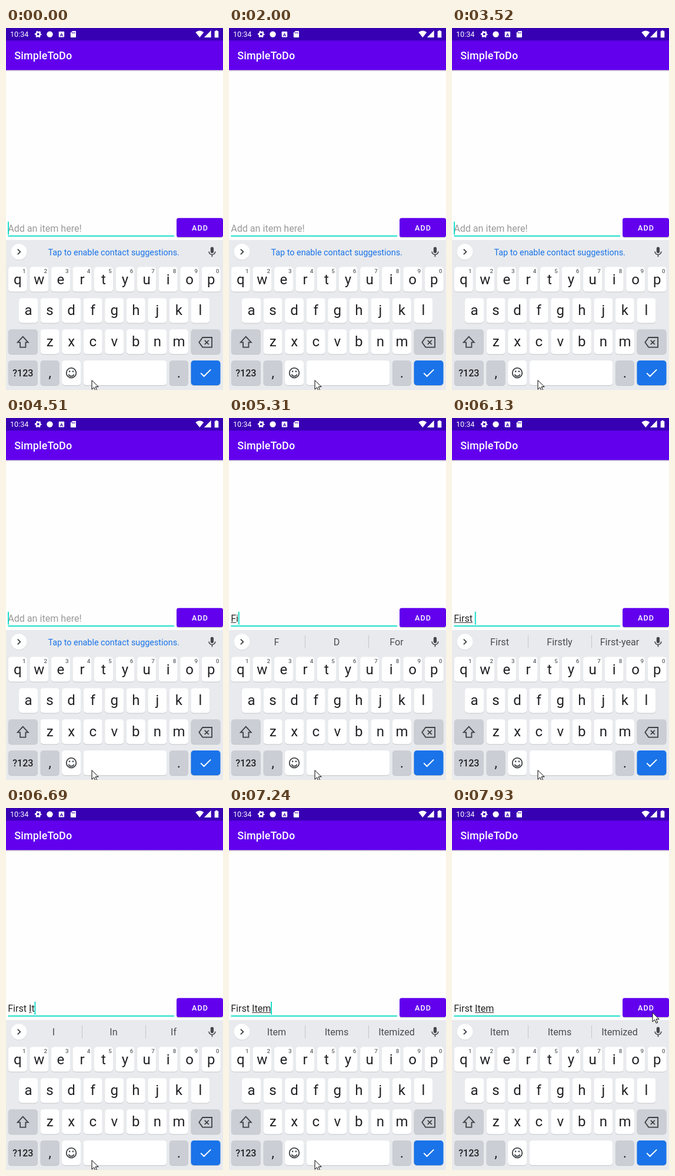
An HTML page that plays this animation: 369x613 px, repeating every 8 s.

```html
<!DOCTYPE html>
<html lang="en">
<head>
<meta charset="utf-8">
<title>To-do list</title>
<style>
  html, body { margin: 0; width: 100%; height: 100%; overflow: hidden; background: #fefefe; }
  svg { display: block; width: 369px; height: 613px; font-family: Roboto, sans-serif; }
  text { white-space: pre; }
  .mid { text-anchor: middle; }
  .line { fill: none; stroke: #3c4043; stroke-width: 1.8; }
</style>
</head>
<body>
<svg viewBox="0 0 369 613">
  <defs>
    <linearGradient id="shade" x2="0" y2="1">
      <stop stop-opacity=".22"/><stop offset="1" stop-opacity="0"/>
    </linearGradient>
  </defs>

  <!-- app bar and status bar -->
  <rect width="369" height="613" fill="#fefefe"/>
  <rect y="71" width="369" height="3" fill="url(#shade)"/>
  <rect width="369" height="71.3" fill="#6200ee"/>
  <rect width="369" height="21.4" fill="#3700b3"/>
  <text x="14.2" y="53" font-size="17.95" font-weight="500" letter-spacing=".15" fill="#fff">SimpleToDo</text>
  <g fill="#fff">
    <text x="7" y="15.2" font-size="12.6">10:34</text>
    <g fill="none" stroke="#fff" transform="translate(54.7 10.6)">
      <circle r="3.3" stroke-width="2.6"/>
      <circle r="5" stroke-width="1.7" stroke-dasharray="2.618" stroke-dashoffset="1.309"/>
    </g>
    <circle cx="74.5" cy="10.6" r="5.2"/>
    <rect x="89.7" y="6" width="9.4" height="9.4" rx="1"/>
    <text class="mid" x="94.4" y="13.6" font-size="8" font-weight="700" fill="#3700b3">A</text>
    <path d="M113 5h5q1 0 1 1v9q0 1-1 1h-7.2q-1 0-1-1V8.2z"/>
    <path d="M112.6 7v2.4m2.1-2.4v2.4m2.1-2.4v2.4" stroke="#3700b3"/>
    <path d="M322.3 7.2Q329.3 2 336.3 7.2L329.3 16z"/>
    <path d="M348.7 4v12h-11.8z"/>
    <path d="M356.6 4h2.8v1.3h1.9v10.9h-6.6V5.3h1.9z"/>
  </g>

  <!-- entry row -->
  <rect x="290" y="324" width="79" height="31.4" rx="3.6" fill="#000" opacity=".2"/>
  <rect x="290" y="321.8" width="79" height="32.2" rx="3.6" fill="#6200ee"/>
  <text class="mid" x="330.1" y="342.7" font-size="12.56" font-weight="500" letter-spacing="1.12" fill="#fff">ADD</text>
  <rect x="3.3" y="351.4" width="282.7" height="1.8" fill="#03dac5"/>
  <text id="entry" x="3.2" y="345.2" font-size="16.1"></text>
  <rect id="mark" y="346" height="1" fill="#333"/>
  <rect id="caret" y="328" width="1.8" height="22" fill="#03dac5"/>

  <!-- keyboard -->
  <rect y="359" width="369" height="254" fill="#e8eaed"/>
  <circle cx="22" cy="379.8" r="13.5" fill="#c9ccd0"/>
  <circle cx="22" cy="379" r="13.5" fill="#fff"/>
  <path class="line" d="M19.8 374.6l4.5 4.4-4.5 4.4"/>
  <g transform="translate(339.9 368.9) scale(.88)" fill="#44474b">
    <rect x="9" y="2" width="6" height="12" rx="3"/>
    <path d="M5.9 11a6.1 5.9 0 0 0 12.2 0M12 17v4" fill="none" stroke="#44474b" stroke-width="1.9"/>
  </g>
  <text id="tip" class="mid" x="183.2" y="384.6" font-size="14.35" fill="#1a73e8">Tap to enable contact suggestions.</text>
  <g id="hints" font-size="16.1" fill="#494c50">
    <path d="M129.5 368v22m108-22v22" stroke="#c4c7cb"/>
    <text class="mid" x="81" y="385.3"></text>
    <text class="mid" x="183" y="385.3"></text>
    <text class="mid" x="285" y="385.3"></text>
  </g>
  <g id="keys"></g>
  <path class="line" d="M28.7 522.6l9 9.8h-4.3v8.2h-9.4v-8.2h-4.3z"/>
  <path class="line" d="M334.3 524h15.8v16.6h-15.8l-6-8.3zM337.8 528.8l7 7m0-7l-7 7"/>
  <circle class="line" cx="111" cy="584" r="8.3"/>
  <path class="line" d="M106.6 586.4a4.6 4.6 0 0 0 8.8 0"/>
  <path d="M106.8 581.6a1.3 1.3 0 1 1 2.6 0a1.3 1.3 0 1 1-2.6 0M112.6 581.6a1.3 1.3 0 1 1 2.6 0a1.3 1.3 0 1 1-2.6 0" fill="#3c4043"/>
  <path d="M331.2 584.4l5.4 5.4 11.6-11.4" fill="none" stroke="#fff" stroke-width="2"/>

  <path id="mouse" d="M.5.5V16l3.7-3.5 2.5 5.8 2.5-1-2.5-5.7h4.9z" fill="#fff" stroke="#000"/>
</svg>
<script>
const LOOP = 8000;
const LEFT = 3.2;
const $ = id => document.getElementById(id);

// Keyboard layout
const PITCH = 36.55;
let keys = '';

function addKey(x, y, label = '', { w = 32, fill = '#fff', size = 24, weight = 400, base = 29, digit = '' } = {}) {
  const mid = x + w / 2;
  keys += `<rect x="${x}" y="${y + 1}" width="${w}" height="42" rx="5" fill="#c3c6ca"/>
    <rect x="${x}" y="${y}" width="${w}" height="42" rx="5" fill="${fill}"/>
    <text class="mid" x="${mid}" y="${y + base}" font-size="${size}" font-weight="${weight}" fill="#202124">${label}</text>
    <text class="mid" x="${x + 27}" y="${y + 10.8}" font-size="9.8" font-weight="500" fill="#5f6368">${digit}</text>`;
}

function addRow(letters, x, y, digits = '') {
  [...letters].forEach((c, i) => addKey(x + i * PITCH, y, c, { digit: digits[i] }));
}

const GRAY = '#cbced4';
addRow('qwertyuiop', 3.8, 404.6, '1234567890');
addRow('asdfghjkl', 22, 457.4);
addRow('zxcvbnm', 58.6, 510.2);
addKey(3.8, 510.2, '', { w: 50, fill: GRAY });
addKey(314.5, 510.2, '', { w: 50, fill: GRAY });
addKey(3.8, 563, '?123', { w: 50, fill: GRAY, size: 16, weight: 500, base: 26.8 });
addKey(58.6, 563, ',', { fill: GRAY });
addKey(95.1, 563);
addKey(131.6, 563, '', { w: 141.6 });
addKey(277.9, 563, '.', { fill: GRAY });
addKey(314.5, 563, '', { w: 50, fill: '#1a73e8' });
$('keys').innerHTML = keys;

// Each step changes part of the state; mark is the underlined character range.
const START = { text: '', mark: [0, 0], caret: true, words: '', mouse: [145.5, 596] };
const steps = [120, 550, 1010, 1570, 2000, 2590, 2990, 3520, 4080, 4510, 5040]
  .map((at, i) => [at, { caret: i % 2 === 1 }]);
steps.push(
  [5160, { text: 'F', mark: [0, 1], caret: true }],
  [5310, { text: 'Fi', words: 'F D For' }],
  [5560, { mark: [0, 2], words: 'Fi Fit First' }],
  [5710, { text: 'Fir', mark: [0, 3], words: 'Fir Firms First' }],
  [5860, { text: 'Firs' }],
  [5980, { mark: [0, 4], words: 'Firs First Firth' }],
  [6130, { text: 'First ', mark: [0, 5], words: 'First Firstly First-year' }],
  [6410, { mark: [0, 0], words: 'time day of' }],
  [6690, { text: 'First It', mark: [6, 7], words: 'I In If' }],
  [6810, { mark: [6, 8], words: "It Its It's" }],
  [6960, { text: 'First Item', mark: [6, 9], words: "Ite Its It's" }],
  [7240, { mark: [6, 10], words: 'Item Items Itemized' }],
  [7510, { mouse: [143, 590] }],
  [7660, { caret: false, mouse: [184, 342] }],
  [7810, { mouse: [284, 345] }],
  [7930, { mouse: [340.5, 346] }]
);

const pen = document.createElement('canvas').getContext('2d');
function widthOf(text) {
  pen.font = '16.1px Roboto, sans-serif';
  return pen.measureText(text).width;
}

const show = (el, on) => el.setAttribute('visibility', on ? 'visible' : 'hidden');
const slots = document.querySelectorAll('#hints text');

function draw(t) {
  const s = Object.assign({}, START, ...steps.filter(([at]) => at <= t).map(step => step[1]));
  const empty = !s.text && t < 5160;

  $('entry').textContent = empty ? 'Add an item here!' : s.text;
  $('entry').setAttribute('fill', empty ? '#999' : '#222');

  const [from, to] = s.mark.map(n => widthOf(s.text.slice(0, n)));
  $('mark').setAttribute('x', LEFT + from);
  $('mark').setAttribute('width', to - from);

  $('caret').setAttribute('x', LEFT + widthOf(s.text) - 0.2);
  show($('caret'), s.caret);

  const words = s.words.split(' ');
  slots.forEach((slot, i) => { slot.textContent = words[i] || ''; });
  show($('hints'), s.words);
  show($('tip'), !s.words);

  $('mouse').setAttribute('transform', `translate(${s.mouse})`);
}

const began = performance.now();
function tick() {
  draw((performance.now() - began) % LOOP);
  requestAnimationFrame(tick);
}
tick();
</script>
</body>
</html>
```
